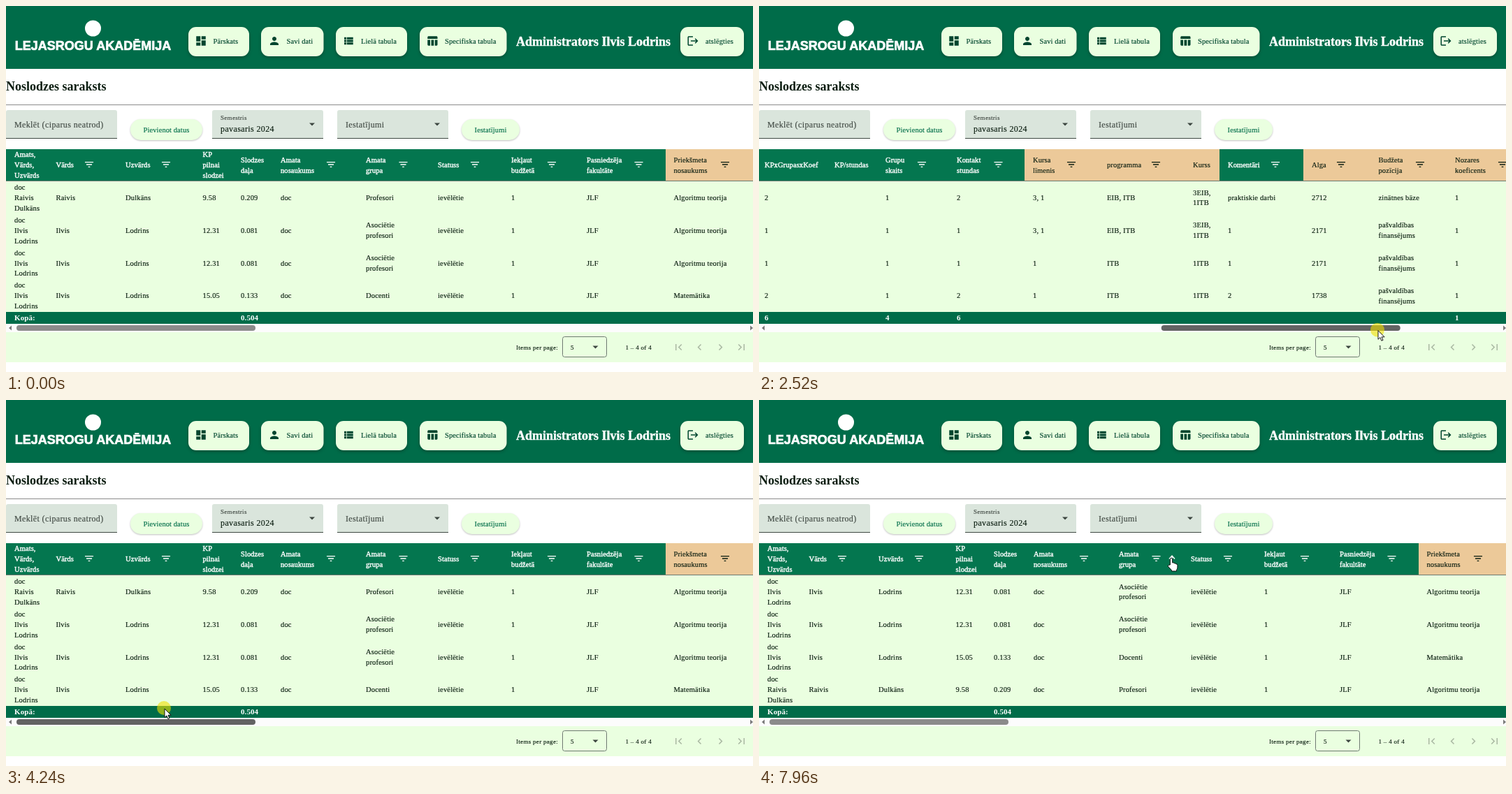
An HTML page that plays this animation: 1069 by 524 pixels, repeating every 8000 ms.

```html
<!DOCTYPE html>
<html lang="lv">
<head>
<meta charset="utf-8">
<title>Noslodzes saraksts</title>
<style>
html, body { margin: 0; width: 100%; height: 100%; overflow: hidden; background: #fff; }
svg { display: block; width: 1069px; height: 524px; }
text { font-family: 'Liberation Serif', 'Times New Roman', serif; font-size: 10.5px; letter-spacing: .09px; fill: #0b1d10; stroke: #0b1d10; stroke-width: .15px; white-space: pre; }
.big { font-size: 18px; font-weight: bold; letter-spacing: 0; stroke: none; }
.cell { letter-spacing: .17px; }
.light { fill: #fff; stroke: #fff; stroke-width: .4px; }
.sum { fill: #fff; stroke: none; font-weight: bold; font-size: 11px; }
.field { font-size: 12px; letter-spacing: .375px; }
.small { font-size: 9px; letter-spacing: .3px; }
.grey { fill: #404943; stroke: #404943; }
.dark { fill: #00452e; stroke: #00452e; }
.link { fill: #006c49; stroke: #006c49; }
.tip { font-size: 8px; font-weight: bold; fill: #fff; stroke: none; letter-spacing: 0; }
.word { font: 900 18px 'Liberation Sans', Arial, sans-serif; letter-spacing: 0; fill: #fff; stroke: #fff; stroke-width: .7px; }
.mid { text-anchor: middle; }
.nav { filter: drop-shadow(0 2px 2px rgba(0,0,0,.28)); }
.pill { filter: drop-shadow(0 1px 1px rgba(0,0,0,.25)); }
</style>
</head>
<body>
<svg id="stage" viewBox="0 0 1069 524"></svg>
<script>
const GREEN = '#006c49', HEAD = '#04764f', MINT = '#eaffe0', SAND = '#ecc999';
const LOOP = 8000, ROW = 46.75, THUMB_MIN = 15, SCROLL = 3.142;

const ICON = {
  board: 'M3 13h8V3H3v10zm0 8h8v-6H3v6zm10 0h8V11h-8v10zm0-18v6h8V3h-8z',
  person: 'M12 12c2.21 0 4-1.79 4-4s-1.79-4-4-4-4 1.79-4 4 1.79 4 4 4zm0 2c-2.67 0-8 1.34-8 4v2h16v-2c0-2.66-5.33-4-8-4z',
  list: 'M4 14h4v-4H4v4zm0 5h4v-4H4v4zM4 9h4V5H4v4zm5 5h12v-4H9v4zm0 5h12v-4H9v4zM9 5v4h12V5H9z',
  table: 'M10 10h5v11h-5zM17 21h3c1.1 0 2-.9 2-2v-9h-5v11zm3-18H5c-1.1 0-2 .9-2 2v3h19V5c0-1.1-.9-2-2-2zM3 19c0 1.1.9 2 2 2h3V10H3v9z',
  exit: 'M17 7l-1.41 1.41L18.17 11H8v2h10.17l-2.58 2.58L17 17l5-5zM4 5h8V3H4c-1.1 0-2 .9-2 2v14c0 1.1.9 2 2 2h8v-2H4V5z',
  filter: 'M10 18h4v-2h-4v2zM3 6v2h18V6H3zm3 7h12v-2H6v2z',
  first: 'M18.41 16.59L13.82 12l4.59-4.59L17 6l-6 6 6 6zM6 6h2v12H6z',
  prev: 'M15.41 7.41L14 6l-6 6 6 6 1.41-1.41L10.83 12z',
  next: 'M10 6L8.59 7.41 13.17 12l-4.58 4.59L10 18l6-6z',
  last: 'M5.59 7.41L10.18 12l-4.59 4.59L7 18l6-6-6-6zM16 6h2v12h-2z'
};

// heading, text x, filter x (0 = none)
const COLS = [
  ['Amats,|Vārds,|Uzvārds', 12, 0], ['Vārds', 71.5, 119], ['Uzvārds', 171, 229],
  ['KP|pilnai|slodzei', 281.5, 0], ['Slodzes|daļa', 336, 0], ['Amata|nosaukums', 393, 465],
  ['Amata|grupa', 515, 568.5], ['Statuss', 618, 671], ['Iekļaut|budžetā', 723, 781],
  ['Pasniedzēja|fakultāte', 831, 905.5], ['Priekšmeta|nosaukums', 955.5, 1029],
  ['Programmas|tips', 1076, 1154], ['Semestris', 1204, 1268], ['Programmas|Daļa', 1320, 1397],
  ['Reģistrācija', 1448, 1521], ['Lais|kods', 1573, 1618], ['KP|skaits|grupai', 1668, 1721],
  ['KPxGrupasxKoef', 1770, 0], ['KP/stundas', 1870, 0], ['Grupu|skaits', 1943, 1995],
  ['Kontakt|stundas', 2045, 2104.5], ['Kursa|līmenis', 2154, 2209], ['programma', 2260, 2330],
  ['Kurss', 2383, 0], ['Komentāri', 2433, 2501], ['Alga', 2553, 2595],
  ['Budžeta|pozīcija', 2648.5, 2708], ['Nozares|koeficents', 2758, 2826], ['Alga|mēnesī', 2876, 0],
  ['Vai|atvaļinājums|ieskaitās', 2940.5, 3020], ['Mēneši|kopā', 3069, 3125]
];
const isSand = x => (x > 944 && x < 1656) || (x > 2142 && x < 2421) || x > 2541;

const person = (a, b) => ['doc|' + a + '|' + b, a, b];
const lead = (kp, part, group, subject) =>
  [kp, part, 'doc', group, 'ievēlētie', '1', 'JLF', subject, 'ITB', 'pavasaris'];
const ALG = 'Algoritmu teorija', ASOC = 'Asociētie|profesori', FUND = 'pašvaldības|finansējums';
const MAIN = ['Nozares pamatnoz', 'automātiska', 'MateB008'];
const BOTH = ['3, 1', 'EIB, ITB', '3EIB,|1ITB'], ONE = ['1', 'ITB', '1ITB'];
const lodrins = person('Ilvis', 'Lodrins');
const ROWS = [
  [...person('Raivis', 'Dulkāns'), ...lead('9.58', '0.209', 'Profesori', ALG), ...MAIN,
    '2', '2', '', '1', '2', ...BOTH, 'praktiskie darbi', '2712', 'zinātnes bāze', '1', '566.808', '0', '5'],
  [...lodrins, ...lead('12.31', '0.081', ASOC, ALG), ...MAIN,
    '1', '1', '', '1', '1', ...BOTH, '1', '2171', FUND, '1', '175.851', '2', '7'],
  [...lodrins, ...lead('12.31', '0.081', ASOC, ALG), ...MAIN,
    '1', '1', '', '1', '1', ...ONE, '1', '2171', FUND, '1', '175.851', '2', '7'],
  [...lodrins, ...lead('15.05', '0.133', 'Docenti', 'Matemātika'), 'sTANDAER', 'Automātiska', 'UZ21',
    '2', '2', '', '1', '2', ...ONE, '2', '1738', FUND, '1', '231.154', '2', '7']
];
const SUMS = { 0: 'Kopā:', 4: '0.504', 16: '6', 17: '6', 19: '4', 20: '6', 27: '1', 28: '1149.664', 29: '1.5', 30: '26' };
const SORTED = [3, 0, 1, 2];

const text = (x, y, s, cls = '') => `<text x="${x}" y="${y}" class="${cls}">${s}</text>`;
const rect = (x, y, w, h, fill, r = 0, extra = '') =>
  `<rect x="${x}" y="${y}" width="${w}" height="${h}" rx="${r}" fill="${fill}" ${extra}/>`;
const path = (d, fill, extra = '') => `<path d="${d}" fill="${fill}" ${extra}/>`;
const icon = (name, x, y, fill, k = .75) =>
  path(ICON[name], fill, `transform="translate(${x - 12 * k} ${y - 12 * k}) scale(${k})"`);
const lines = (x, cy, s, cls) => {
  const parts = s.split('|');
  return parts.map((p, i) => text(x, cy + 3.7 + (i - (parts.length - 1) / 2) * 15, p, cls)).join('');
};
const drop = (x, y) => path(`M${x - 4} ${y - 2}h8l-4 4z`, '#3c4640');

function topBar() {
  const nav = [['board', 261, 87, 279, 296.5, 'Pārskats'], ['person', 365, 89.5, 384, 401.5, 'Savi dati'],
    ['list', 472, 102, 490, 508, 'Lielā tabula'], ['table', 592, 124.5, 610, 628, 'Specifiska tabula'],
    ['exit', 965, 91, 983, 1001, 'atslēgties']];
  return rect(0, 0, 1069, 90, GREEN) +
    '<circle cx="124.5" cy="32" r="11.5" fill="#fff"/>' +
    text(124.5, 62.5, 'LEJASROGU AKADĒMIJA', 'word mid') +
    nav.map(([name, x, w, ix, tx, s]) =>
      rect(x, 30, w, 42, MINT, 11, 'class="nav"') + icon(name, ix, 50, '#00452e') +
      text(tx, 54.3, s, 'dark')).join('') +
    '<g style="--c:#fff">' + text(840.5, 57, 'Administrators Ilvis Lodrins', 'big mid light') + '</g>';
}

function controls() {
  const box = x => path(`M${x} 190V152q0-3 3-3h153q3 0 3 3v38z`, '#dae5dc') + rect(x, 189, 159, 1, '#3f4943');
  const pill = (x, w, s) => rect(x, 162, w, 30, MINT, 15, 'class="pill"') +
    text(x + w / 2, 180.6, s, 'mid link');
  return text(0, 121, 'Noslodzes saraksts', 'big') + rect(0, 141, 1069, 1, '#8d8d8d') +
    box(0) + text(12, 173.8, 'Meklēt (ciparus neatrod)', 'field grey') +
    pill(178, 103, 'Pievienot datus') +
    box(295) + text(307, 163, 'Semestris', 'small grey') + text(307, 179.6, 'pavasaris 2024', 'field') + drop(438, 169.5) +
    box(474) + text(486, 173.8, 'Iestatījumi', 'field grey') + drop(617, 169.5) +
    pill(652, 83, 'Iestatījumi');
}

function table() {
  const head = COLS.map(([s, x, f]) => {
    const sand = isSand(x);
    return lines(x, 227.5, s, sand ? '' : 'light') + (f ? icon('filter', f, 227, sand ? '#0b1d10' : '#fff', .67) : '');
  }).join('');
  const rows = ROWS.map((row, i) => `<g id="row${i}">` +
    row.map((s, c) => s && lines(COLS[c][1], 0, s, 'cell')).join('') + '</g>').join('');
  const sums = Object.keys(SUMS).map(c => text(COLS[c][1], 450, SUMS[c], 'sum')).join('');
  return rect(0, 250, 1069, 188, MINT) + rect(0, 438, 1069, 17, GREEN) +
    '<g id="table">' + rect(0, 205, 3260, 45, HEAD) +
    [[944, 712], [2142, 279], [2541, 719]].map(([x, w]) => rect(x, 205, w, 45, SAND)).join('') +
    rect(0, 250, 3260, 1, '#6f7972') + head + rows + sums +
    ['487.5', '591'].map((x, i) =>
      `<path id="sort${i}" d="M${x} 233V223.2m-4 4.2l4-4.2 4 4.2" fill="none" stroke="#fff" stroke-width="1.5"/>`).join('') +
    '</g>';
}

function footer() {
  const off = '#a9b8a2';
  return rect(0, 455, 1069, 12, '#fcfcfc') +
    path('M4 461l4-3.5v7z', '#7a7a7a') + path('M1069 461l-4-3.5v7z', '#7a7a7a') +
    rect(15, 457, 342, 8, '#8b8b8b', 4, 'id="thumb"') +
    rect(0, 467, 1069, 43, MINT) +
    text(730, 491.5, 'Items per page:', 'small') +
    rect(796.5, 473.5, 63, 29, 'none', 3, 'stroke="#6f7972"') +
    text(808, 491.5, '5', 'small') + drop(843.5, 488.5) + text(886.5, 491.5, '1 – 4 of 4', 'small') +
    icon('first', 962.5, 488.5, off) + icon('prev', 992.5, 488.5, off) +
    icon('next', 1022.5, 488.5, off) + icon('last', 1052.5, 488.5, off);
}

function overlay() {
  const line = 'stroke="#000" stroke-width=".9" stroke-linejoin="round"';
  return '<g id="tip">' + rect(-28.5, 250, 57, 15, '#2c322d', 3) + text(0, 260, 'Filtrēt kolonu', 'tip mid') + '</g>' +
    '<g id="mouse"><circle id="press" cx="-1" cy="-1" r="10" fill="#f0e000"/>' +
    path('M0 0v12.6l2.9-2.7 2 4.7 2.1-.9-2-4.5h4.1z', '#fff', line + ' id="arrow"') +
    path('M-1.6 9.5V1.4a1.6 1.6 0 0 1 3.2 0v5q2.5-.6 2.7 1 2.4-.6 2.5 1 2.1-.4 2.1 1.5v3q0 2-1.4 4v1.6H.4v-1.4L-4.4 12q-.9-1.9.8-2.2z',
      '#fff', line + ' id="hand"') + '</g>';
}

document.getElementById('stage').innerHTML = topBar() + controls() + table() + footer() + overlay();
const el = id => document.getElementById(id);
const move = (id, x, y) => el(id).setAttribute('transform', `translate(${x} ${y})`);
const show = (id, v) => el(id).setAttribute('opacity', v);
const clamp = (v, a, b) => Math.min(b, Math.max(a, v));

// time, x, y, ease-out strength
const TRACK = [
  [470, 318, 476], [740, 307, 463, .6], [1330, 307, 463], [2030, 687, 461], [2800, 960, 466, .4],
  [3204, 960, 466], [3260, 940, 466], [3960, 300, 454], [4030, 236, 447], [4240, 227, 442],
  [4300, 227, 441], [4870, 340, 280], [5430, 470, 230, .6], [5710, 471, 228.5], [5780, 471, 228.5],
  [6060, 486, 229, .5], [6260, 486, 229], [6610, 494, 228], [6750, 494, 228], [7490, 590, 226.5, .5]
];
function cursor(t) {
  const i = TRACK.findIndex(k => k[0] > t);
  if (i < 1) return (i ? TRACK[TRACK.length - 1] : TRACK[0]).slice(1, 3);
  const a = TRACK[i - 1], b = TRACK[i], k = b[3] || 0;
  let p = (t - a[0]) / (b[0] - a[0]);
  p *= 1 + k - k * p;
  return [a[1] + (b[1] - a[1]) * p, a[2] + (b[2] - a[2]) * p];
}
const fade = (t, on, off) => clamp(Math.min((t - on) / 150, (off - t) / 130), 0, 1);

const STARTS = [0, 470, 1200, 1330, 2030, 3260, 6260, 6750, 7620];
function tick(t) {
  const s = STARTS.filter(v => v <= t).pop();
  return s + Math.floor((t - s) / 70) * 70;
}

function draw(now) {
  const t = tick(now % LOOP);
  const [x, y] = cursor(t);
  const drag = t >= 1200 && t < 4300;
  const sorted = t >= 7820;

  const thumb = drag ? clamp(cursor(t - 56)[0] - 292, THUMB_MIN, 712) : THUMB_MIN;
  el('thumb').setAttribute('x', thumb);
  el('thumb').setAttribute('fill', drag || (t >= 470 && y > 456 && y < 467) ? '#636363' : '#8b8b8b');
  move('table', Math.round((THUMB_MIN - thumb) * SCROLL), 0);
  ROWS.forEach((_, i) => move('row' + i, 0, 274.3 + ROW * (sorted ? SORTED[i] : i)));

  const inHead = !drag && t > 4300 && y < 250;
  show('sort0', inHead && x > 381 && x < 503 ? .54 : 0);
  show('sort1', sorted ? 1 : inHead && x > 503 && x < 606 ? .54 : 0);

  const second = t > 6500;
  move('tip', second ? 568.5 : 465.5, 0);
  show('tip', second ? fade(t, 6960, 7430) : fade(t, 5642, 6060));

  move('mouse', x, y);
  show('mouse', t >= 470 ? 1 : 0);
  show('press', drag || (t >= 7620 && t < 7820) ? .6 : 0);
  show('hand', inHead ? 1 : 0);
  show('arrow', inHead ? 0 : 1);
}

const begin = performance.now();
function loop() {
  draw(performance.now() - begin);
  requestAnimationFrame(loop);
}
loop();
</script>
</body>
</html>
```
